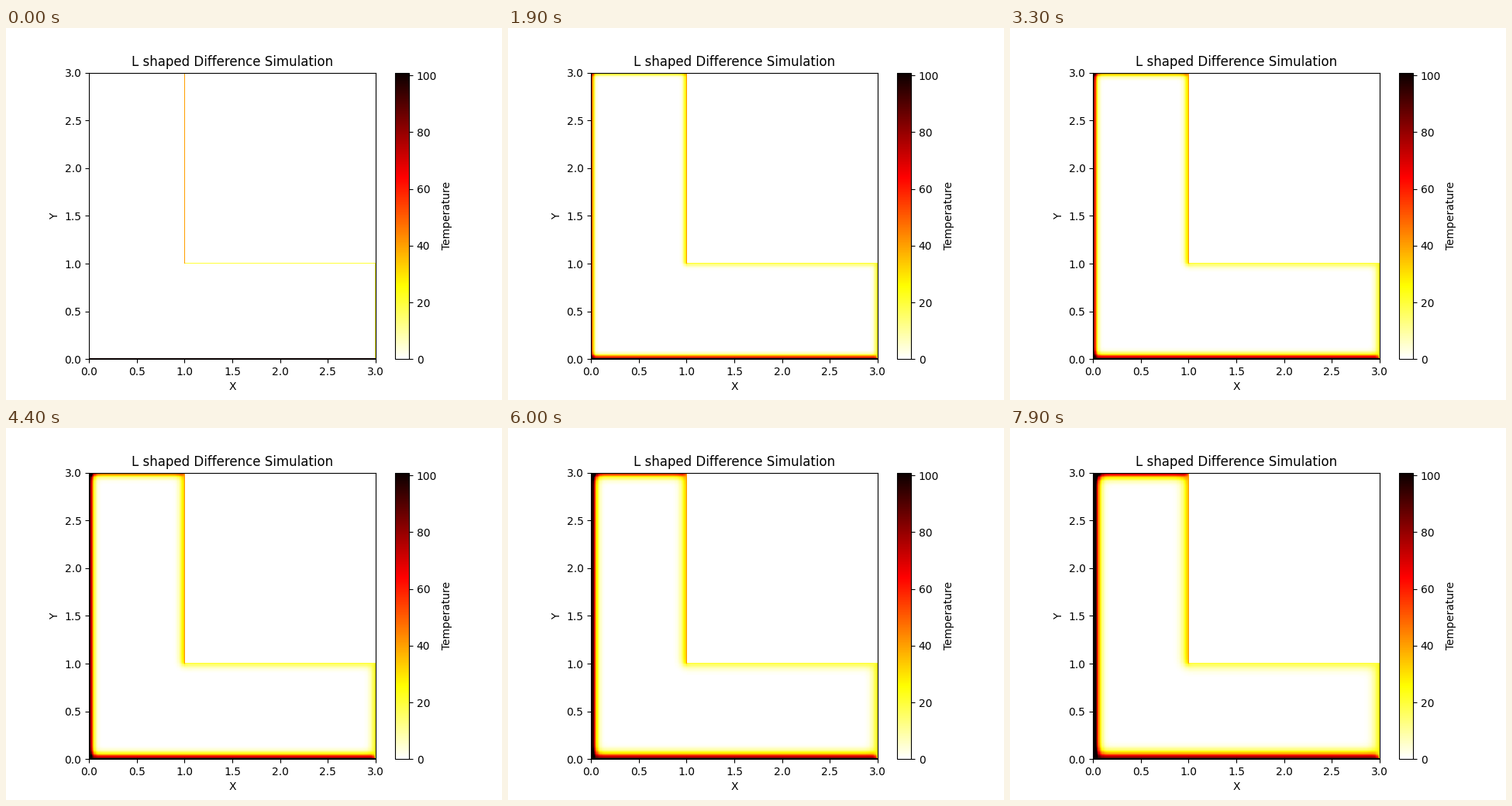
Write a matplotlib script that moves like this. It is 640 by 480 pixels and loops after 8000 ms.

```python
import numpy as np
import matplotlib.pyplot as plt
from matplotlib.animation import FuncAnimation

FRAMES = 80
INTERVAL = 100
N = 301            # grid points per side, spacing 0.01
C = 100            # index of the inner corner
BOTTOM, RIGHT, LEDGE, WALL = 100, 25, 20, 40
LEFT_FLUX, TOP_FLUX = 35, 20   # temperature gain per cell across the edge


def fix_edges(u):
    """Fixed temperatures on the boundary; the cut-out stays cold."""
    u[C + 1:, C + 1:] = 0
    u[:C + 1, -1] = RIGHT
    u[C, C:] = LEDGE
    u[C:, C] = WALL
    u[0] = BOTTOM
    return u


def step(u):
    """One explicit heat step; ghost cells carry the heat flux."""
    g = np.pad(u, 1, mode="edge")
    g[1:-1, 0] = u[:, 1] + 2 * LEFT_FLUX
    g[-1, 1:-1] = u[-2] + 2 * TOP_FLUX
    mean = (g[:-2, 1:-1] + g[2:, 1:-1] + g[1:-1, :-2] + g[1:-1, 2:]) / 4
    return fix_edges(mean)


def simulate():
    states = [fix_edges(np.zeros((N, N)))]
    for _ in range(FRAMES - 1):
        states.append(step(states[-1]))
    return states


states = simulate()

fig, ax = plt.subplots(figsize=(6.4, 4.8), dpi=100)
image = ax.imshow(states[0], cmap="hot_r", vmin=0, vmax=101, origin="lower",
                  extent=(0, 3, 0, 3), interpolation="nearest")
ticks = np.arange(0, 3.1, 0.5)
ax.set(title="L shaped Difference Simulation", xlabel="X", ylabel="Y",
       xticks=ticks, yticks=ticks)
fig.colorbar(image, ax=ax, label="Temperature")


def draw(i):
    image.set_data(states[i])
    return [image]


anim = FuncAnimation(fig, draw, frames=FRAMES, interval=INTERVAL,
                     repeat=True, repeat_delay=0)
plt.show()
```
